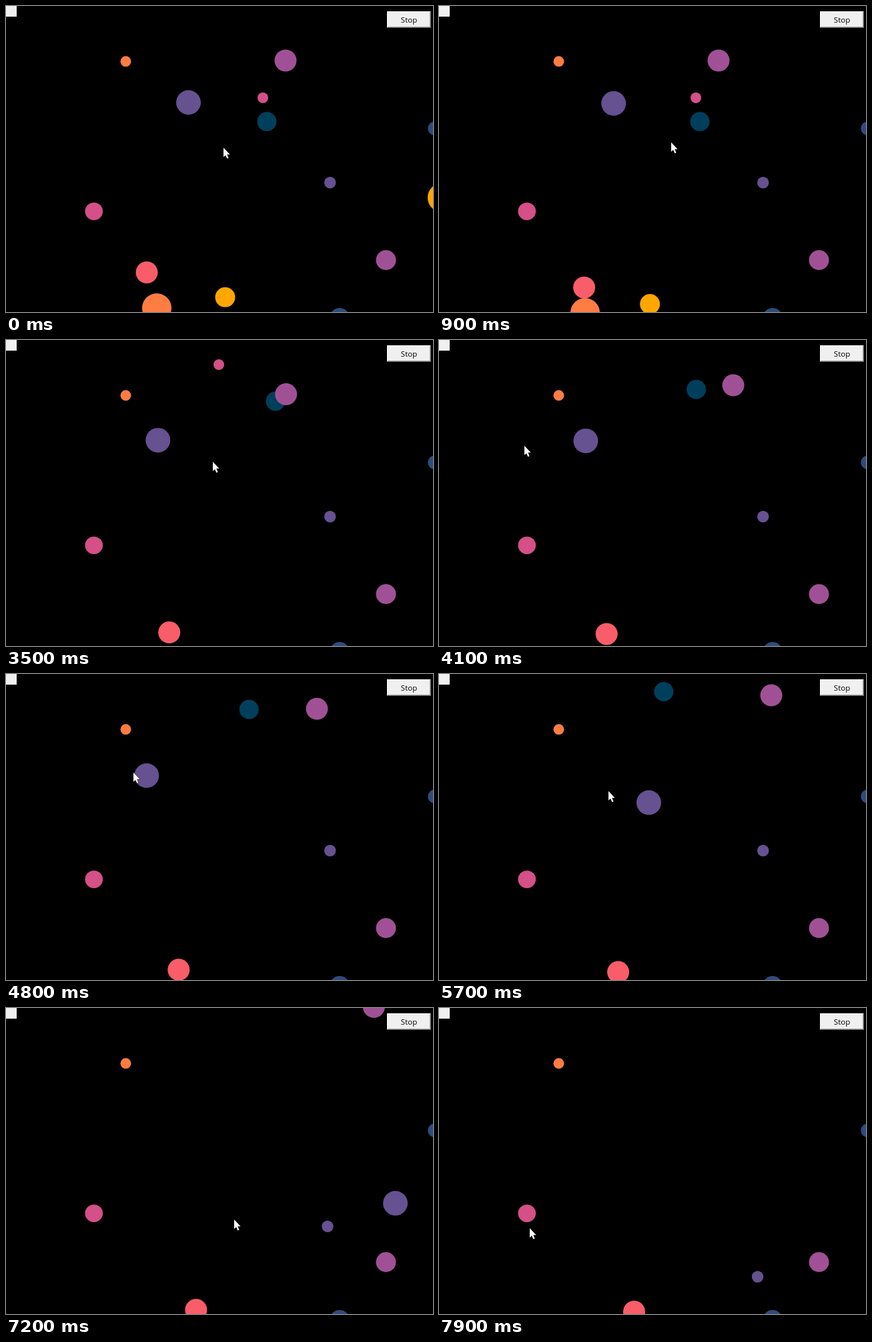
Write an HTML page with a canvas that moves like this. It is 640 by 460 pixels and loops after 8 s.

```html
<!DOCTYPE html>
<html lang="en">
<head>
<meta charset="utf-8">
<title>Bouncing balls</title>
<style>
html, body { margin: 0; width: 100%; height: 100%; overflow: hidden; background: #000; }
canvas { display: block; }
</style>
</head>
<body>
<canvas id="stage" width="640" height="460"></canvas>
<script>
const ctx = document.getElementById('stage').getContext('2d');
const LOOP = 8000, STEP = 100;

const TEAL = '#003f5c', BLUE = '#2f4b7c', PURPLE = '#665191', MAGENTA = '#a05195',
      PINK = '#d45087', CORAL = '#f95d6a', ORANGE = '#ff7c43', YELLOW = '#ffa600',
      FACE = '#f0f0f0';

// Velocities are in px per second; each hit sets a new one at a given time.
const hit = (time, vx, vy) => ({ time, vx, vy });
const ball = (color, r, x, y, ...hits) => ({ color, r, x, y, hits });

const balls = [
  ball(BLUE, 10.3, 642.5, 184),
  ball(BLUE, 15, 500, 469),
  ball(ORANGE, 8, 179.5, 83.3),
  ball(PINK, 13.3, 131.8, 308.7),
  ball(MAGENTA, 15, 569.5, 382),
  ball(YELLOW, 22, 654, 288, hit(0, 11, 0)),
  ball(YELLOW, 15, 328.5, 437.8, hit(0, -13.7, 11.4)),
  ball(ORANGE, 22, 226, 454, hit(0, -7.8, 7.8), hit(900, -9.2, 16)),
  ball(CORAL, 16.5, 211, 400.5, hit(0, 7.3, 25.2), hit(1200, 10.85, 3.85)),
  ball(TEAL, 14.5, 391, 173.7, hit(2100, 0, -27.4), hit(2600, 17, -78.2), hit(3450, -30.5, -29.8)),
  ball(PINK, 8, 385, 138, hit(2600, -73.3, -112.2)),
  ball(MAGENTA, 16.5, 419, 82, hit(3480, 35.6, -22.5)),
  ball(PURPLE, 8.7, 485.7, 265.5, hit(6620, -6.4, 108.2)),
  ball(PURPLE, 18.5, 273.5, 145, hit(0, -13.07, 1.62), hit(5100, 179.4, 66.8))
];

// Resting points of the pointer: time, x, y.
const pointer = [[0, 326, 214], [900, 348, 206], [2300, 393, 183], [3500, 310, 184],
  [4100, 128, 160], [4800, 191, 149], [5400, 189, 149], [6500, 547, 305], [7900, 136, 332]];
const arrow = new Path2D('M0 0V14L3 11.2L5.4 16.4L7.6 15.4L5.3 10.3H9.6Z');

function ballAt({ x, y, hits }, t) {
  hits.forEach(({ time, vx, vy }, i) => {
    const end = Math.min(t, hits[i + 1]?.time ?? LOOP);
    const seconds = Math.max(0, end - time) / 1000;
    x += vx * seconds;
    y += vy * seconds;
  });
  return [x, y];
}

function pointerAt(t) {
  const i = pointer.findIndex(p => p[0] >= t);
  const [t1, x1, y1] = pointer[i];
  const [t0, x0, y0] = pointer[Math.max(0, i - 1)];
  const k = t1 > t0 ? (t - t0) / (t1 - t0) : 0;
  const ease = k * k * (3 - 2 * k);
  return [x0 + (x1 - x0) * ease, y0 + (y1 - y0) * ease].map(Math.round);
}

function rect(color, x, y, w, h) {
  ctx.fillStyle = color;
  ctx.fillRect(x, y, w, h);
}

function drawBall(b, t) {
  ctx.fillStyle = b.color;
  ctx.beginPath();
  ctx.arc(...ballAt(b, t), b.r, 0, Math.PI * 2);
  ctx.fill();
}

function drawButton() {
  rect('#696969', 571, 8, 66, 25);
  rect('#fff', 571, 8, 65, 24);
  rect('#a0a0a0', 572, 9, 64, 23);
  rect(FACE, 572, 9, 63, 22);
  ctx.fillStyle = '#000';
  ctx.font = '11.5px "Open Sans", "Noto Sans", sans-serif';
  ctx.textAlign = 'center';
  ctx.fillText('Stop', 604, 25);
}

function drawPointer(t) {
  const [x, y] = pointerAt(t);
  ctx.save();
  ctx.translate(x, y - 1);
  ctx.strokeStyle = '#000';
  ctx.stroke(arrow);
  ctx.fillStyle = '#fff';
  ctx.fill(arrow);
  ctx.restore();
}

function draw(now) {
  const t = Math.floor((now % LOOP) / STEP) * STEP;
  rect('#000', 0, 0, 640, 460);
  balls.forEach(b => drawBall(b, t));
  rect(FACE, 0, 0, 16, 16);
  drawButton();
  drawPointer(t);
}

let start;
function tick(now) {
  start ??= now;
  draw(now - start);
  requestAnimationFrame(tick);
}
requestAnimationFrame(tick);
</script>
</body>
</html>
```
